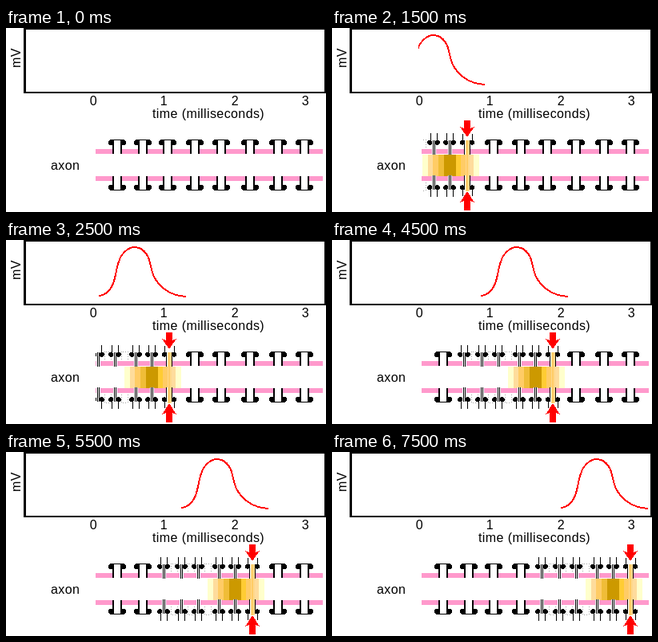
An HTML page that plays this animation: 400x231 px, repeating every 8000 ms.

```html
<!DOCTYPE html>
<html lang="en">
<head>
<meta charset="utf-8">
<title>Action potential along an axon</title>
<style>
html, body { margin: 0; width: 100%; height: 100%; overflow: hidden; background: #fff; }
svg { display: block; width: 400px; height: 231px; }
text { font: 16px "Liberation Sans", Arial, sans-serif; letter-spacing: .4px; }
</style>
</head>
<body>
<svg viewBox="0 0 400 231" shape-rendering="crispEdges">
  <defs>
    <clipPath id="plot"><rect x="108" y="2" width="290" height="78"/></clipPath>
    <clipPath id="nerve"><rect x="112" y="110" width="288" height="121"/></clipPath>
  </defs>
  <path d="M22 0H400V82H22ZM25 2V80H398V2Z" fill-rule="evenodd"/>
  <text transform="translate(18 50) rotate(-90)">mV</text>
  <g text-anchor="middle">
    <text x="109.5" y="97">0</text>
    <text x="197.5" y="97">1</text>
    <text x="286.5" y="97">2</text>
    <text x="374.5" y="97">3</text>
  </g>
  <text x="183" y="113">time (milliseconds)</text>
  <text x="56" y="178">axon</text>
  <path d="M112 155H396M112 189H396" stroke="#f9c" stroke-width="6"/>
  <g id="rest"></g>
  <g clip-path="url(#plot)">
    <path id="curve" fill="none" stroke="#f00" stroke-width="2"
      d="M-44 61C-35 60 -29 54 -25.5 44C-21.5 32 -22 22 -16 11C-11 4 -6 0 0 0C8 0 14 4 18 13C21 20 21 29 25 37C31 49 44 61 65 62"/>
  </g>
  <g clip-path="url(#nerve)"><g id="pulse"></g></g>
</svg>
<script>
const $ = id => document.getElementById(id);
const START = 500, STEP = 1000, LOOP = 8000;
const restX = [139, 171, 202, 236, 269, 305, 340, 373];
const steps = [ // pulse front, curve peak
  [136, 91], [169, 126], [204, 160], [239, 195],
  [276, 230], [308, 263], [341, 295], [373, 330]
];

const rect = (x, y, w, h, fill) =>
  `<rect x="${x}" y="${y}" width="${w}" height="${h}" fill="${fill}"/>`;
const line = (d, w, extra = '') =>
  `<path d="${d}" fill="none" stroke="#000" stroke-width="${w}" ${extra}/>`;
const dots = (x, r) => [-x, x].map(cx => `<circle cx="${cx}" cy="143.7" r="${r}"/>`).join('');
const mirror = s => s + `<g transform="translate(0 344) scale(1 -1)">${s}</g>`;
const at = (x, s) => `<g transform="translate(${x} 0)">${s}</g>`;

const wideGate = mirror(
  rect(-5, 141, 10, 18, '#fff') +
  line('M-5 158V141M5 158V141', 1.6) +
  line('M-9 141.5H-4M4 141.5H9', 3) +
  line('M-4 140.5H4', 1) + dots(8, 3.1));

const narrowGate = mirror(
  rect(-2, 141, 5, 18, '#fff') +
  line('M-.5 159V141M1.5 159V141', 1) +
  line('M-3.5 132V147M4.5 132V147', 1.2) + dots(4.8, 3));

const frontGate = mirror(
  rect(-4, 141, 8, 18, '#fff') +
  line('M-3.5 159V141M3.5 159V141', 1) +
  line('M-5.5 133V147M6.5 133V147', 1.2) + dots(6, 3));

const column = rect(-2, 141, 5, 64, '#fed88c') + rect(-1, 141, 2, 64, '#fc6');

const trace = mirror(line('M-4 150V140H4V150', .8, 'stroke-dasharray="1 2" opacity=".45"'));

const bands = [
  [-56, '#ffc'], [-49, '#fedc9c'], [-43, '#fc6'], [-36, '#f0bd38'], [-29, '#c90'],
  [-14, '#fc3'], [-8, '#fc6'], [-1, '#fedc9c'], [8, '#ffc'], [15]
];
const glow = bands.slice(0, -1)
  .map(([x, c], i) => rect(x, 159, bands[i + 1][0] - x, 27, c)).join('');

const arrows = '<path fill="#f00" d="M-4 116H4V126L9 124L0 137L-9 124L-4 126Z' +
  'M-4 229H4V217L9 219L0 205L-9 219L-4 217Z"/>';

$('pulse').innerHTML = glow +
  [-98, -77, -56].map(x => at(x, trace)).join('') +
  [-111, -89, -68, -42, -22].map(x => at(x, narrowGate)).join('') +
  frontGate + column + arrows;
$('rest').innerHTML = restX.map(x => at(x, wideGate)).join('');
const gates = [...$('rest').children];

let shown;
function draw(t) {
  const i = Math.floor((t % LOOP - START) / STEP);
  if (i === shown) return;
  shown = i;
  const on = i >= 0;
  const [front, peak] = on ? steps[i] : [0, 0];
  $('pulse').style.display = $('curve').style.display = on ? '' : 'none';
  $('pulse').setAttribute('transform', `translate(${front} 0)`);
  $('curve').setAttribute('transform', `translate(${peak} 9)`);
  gates.forEach((g, k) => {
    const free = !on || restX[k] > front + 15 || restX[k] < front - 125;
    g.style.display = free ? '' : 'none';
  });
}

const t0 = performance.now();
function loop() {
  draw(performance.now() - t0);
  requestAnimationFrame(loop);
}
loop();
</script>
</body>
</html>
```
